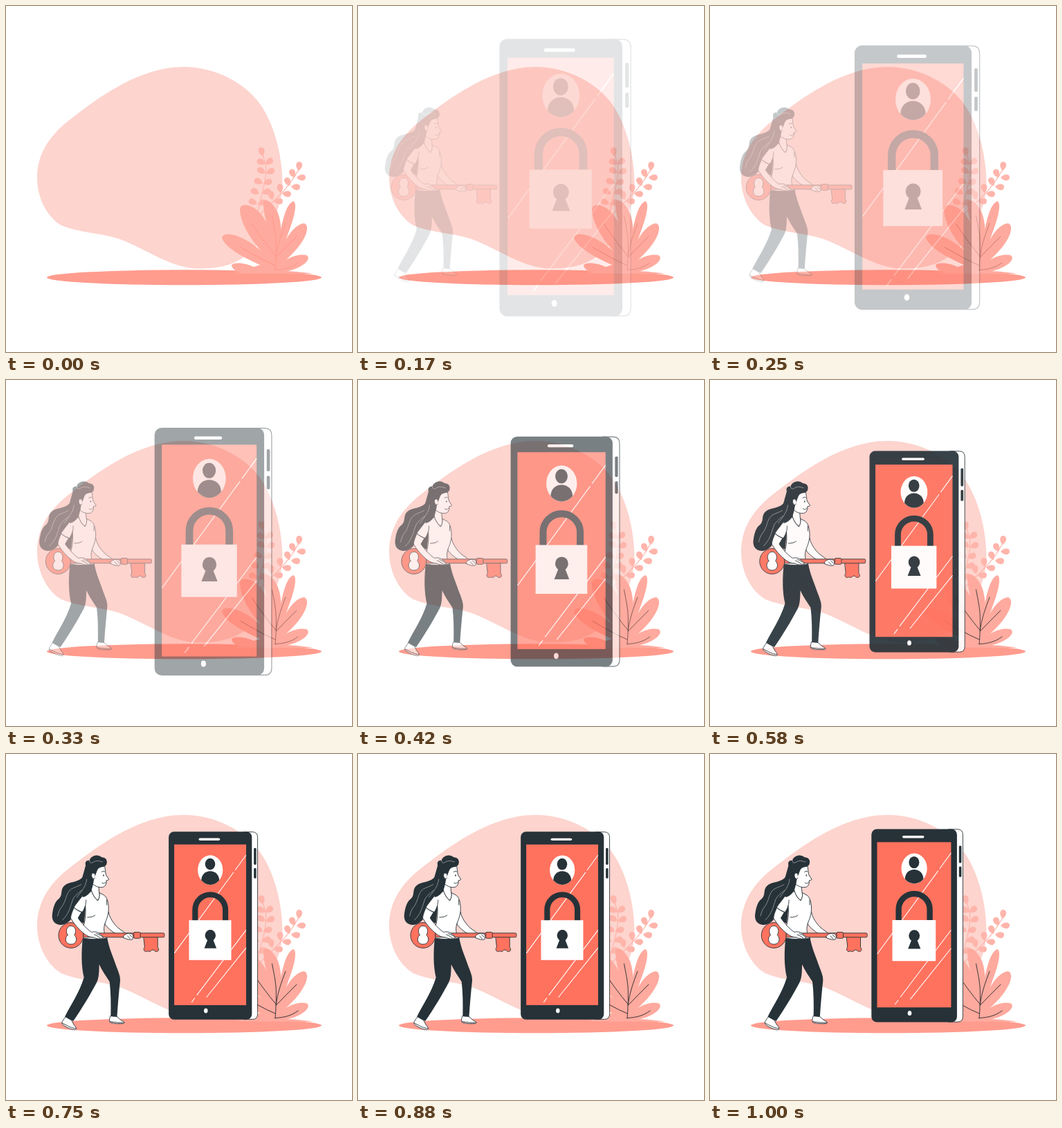
Animation, 500 px wide and 500 px high, one loop 1.04 s. Source, as an HTML page without scripts:

```html
<!DOCTYPE html>
<html lang="en">
<head>
<meta charset="utf-8">
<title>Unlock</title>
<style>
@property --p { syntax: "<number>"; inherits: true; initial-value: 0; }

html, body { margin: 0; width: 100%; height: 100%; overflow: hidden; background: #fff; }
svg { display: block; width: 100%; height: 100%; animation: enter 1.04s -4ms step-end infinite; }

/* cubic-bezier(.36, -.01, .5, 1.38) over one second, held at 24 steps a second */
@keyframes enter {
  0% { --p: 0 }      4% { --p: .013 }   8% { --p: .037 }   12% { --p: .075 }  16% { --p: .127 }
  20% { --p: .191 }  24% { --p: .264 }  28% { --p: .347 }  32% { --p: .437 }  36% { --p: .528 }
  40% { --p: .617 }  44% { --p: .702 }  48% { --p: .782 }  52% { --p: .853 }  56% { --p: .915 }
  60% { --p: .966 }  64% { --p: 1.006 } 68% { --p: 1.035 } 72% { --p: 1.055 } 76% { --p: 1.064 }
  80% { --p: 1.065 } 84% { --p: 1.056 } 88% { --p: 1.04 }  92% { --p: 1.015 } 96%, 100% { --p: 1 }
}

.veins, .phone, .woman { opacity: var(--p); }
.phone { transform-origin: 299.5px 248px; transform: scale(calc(1.5 - .5 * var(--p))); }
.woman { transform: translateX(calc(30px * (var(--p) - 1))); }

.dark { fill: #263238; }
.white { fill: #fff; }
.coral { fill: #ff725e; }
.ink { stroke: #263238; stroke-width: .9; stroke-linejoin: round; stroke-linecap: round; }
.line { fill: none; }
.shine { fill: none; stroke: #fff; stroke-width: 1.1; }
.strand { fill: none; stroke: #c3c8ca; stroke-width: .6; stroke-linecap: round; }
</style>
</head>
<body>
<svg viewBox="0 0 500 500">
  <defs>
    <path id="bud" d="M0 0C-6 -4 -6.500 -12.500 -1 -13C5 -13 6 -6 0 0z"/>
    <path id="ribs" d="M389 382C390 370 391 350 390 336C389 324 386 312 384.500 303M404 314C398 330 392 346 390.500 362M355.500 315C366 331 378 347 390 361.500M420 333C409 344 399 354 390.500 363M339 348.500C356 358 372 368 389 375M422 371C413 378 402 381 389 381.500"/>
  </defs>

  <path fill="#fdd4ce" d="M257 88C303 88 347 112 368 143C388 172 400 217 399.500 260C397 300 374 340 345 362C326 376 303 379.500 278 379.500C240 379.500 204 352 165 337C135 327 105 328 80 317C59 305 44.500 276 45 247C45.500 216 60 192 84 171C105 154 130 135 152 122C187 101 222 88 257 88z"/>
  <ellipse cx="257.500" cy="392.300" rx="198.500" ry="11" fill="#ff9c8e"/>

  <g fill="#ffb5ab">
    <path d="M363 303C367 275 379 250 375 228L371 215M365 304C382 284 405 270 423 236" fill="none" stroke="#ffb5ab" stroke-width="1.200"/>
    <use href="#bud" transform="translate(371 217) rotate(-10)"/>
    <use href="#bud" transform="translate(375 228) rotate(-64)"/>
    <use href="#bud" transform="translate(375 229) rotate(55)"/>
    <use href="#bud" transform="translate(375 241) rotate(-60)"/>
    <use href="#bud" transform="translate(376 242) rotate(68)"/>
    <use href="#bud" transform="translate(371 256) rotate(-65)"/>
    <use href="#bud" transform="translate(372 257) rotate(72)"/>
    <use href="#bud" transform="translate(366 271) rotate(-62)"/>
    <use href="#bud" transform="translate(370 271) rotate(72)"/>
    <use href="#bud" transform="translate(363 286) rotate(-62)"/>
    <use href="#bud" transform="translate(364 287) rotate(70)"/>
    <use href="#bud" transform="translate(423 238) rotate(8)"/>
    <use href="#bud" transform="translate(417 248) rotate(-22)"/>
    <use href="#bud" transform="translate(420 248) rotate(92)"/>
    <use href="#bud" transform="translate(410 260) rotate(-22)"/>
    <use href="#bud" transform="translate(412 261) rotate(98)"/>
    <use href="#bud" transform="translate(397 270) rotate(-4)"/>
    <use href="#bud" transform="translate(399 271) rotate(98)"/>
    <use href="#bud" transform="translate(385 280) rotate(-12)"/>
    <use href="#bud" transform="translate(387 282) rotate(94)"/>
  </g>

  <g fill="#ffaa9e">
    <path d="M340 385C331 383 326 379 326 374C332 369 348 372 358 377L374 372L392 372V386z"/>
    <path d="M390 384C362 372 318 354 312 335C314 325 338 329 364 350L392 372z"/>
    <path d="M390 376C366 354 339 322 338 294C339 284 354 286 366 298C378 310 388 340 394 370z"/>
    <path d="M390 372C385 342 371 302 372 284C374 276 385 283 392 297C399 312 400 340 394 372z"/>
    <path d="M390 372C394 340 400 288 415 282C422 284 416 308 408 328C403 342 398 358 392 374z"/>
    <path d="M389 378C395 350 413 315 431 314C440 318 433 336 421 350C412 361 401 370 389 382z"/>
    <path d="M388 384C398 366 420 357 434 360C441 364 434 373 420 379C410 383 400 385 388 385z"/>
    <path d="M330 386.500C360 380 420 382 444 387z"/>
  </g>
  <use href="#ribs" fill="none" stroke="#ff9c8e" stroke-width="1.200"/>
  <use href="#ribs" class="veins line ink"/>

  <g class="phone">
    <path class="white ink" d="M345 108.800H358Q365.400 109 365.400 117V379Q365.400 387.200 358 387.200H345z"/>
    <rect class="dark" x="359.800" y="132.500" width="3.600" height="25" rx="1.600"/>
    <rect class="dark" x="359.800" y="162.500" width="3.600" height="15.300" rx="1.600"/>
    <rect class="dark" x="233.300" y="108.400" width="123.600" height="279.200" rx="8"/>
    <rect class="coral" x="241.500" y="127.400" width="106.900" height="238.800"/>
    <rect class="white" x="278" y="118" width="31.400" height="3.500" rx="1.750"/>
    <ellipse class="white" cx="288.500" cy="374.500" rx="2.800" ry="3.500"/>
    <path class="shine" d="M348.300 143.100L331.900 165.700M329.800 168.600L241.700 289M348.300 254.500L275 351.500M272.200 355.500L267.300 362M348.300 281L289.300 354.700"/>

    <ellipse class="white" cx="295.100" cy="165.400" rx="18.600" ry="21.900"/>
    <ellipse class="dark" cx="294.900" cy="156.600" rx="7.500" ry="8.700"/>
    <path class="dark" d="M281.800 180.700C281.800 172 288 167 295 167S308.400 172 308.400 180.700A18.600 21.900 0 0 1 281.800 180.700z"/>

    <path d="M272.600 241V224.500A22.500 22.500 0 0 1 317.600 224.500V241" fill="none" stroke="#263238" stroke-width="8.400"/>
    <rect class="white" x="263.500" y="240" width="62.700" height="59.200"/>
    <ellipse class="dark" cx="295.200" cy="262.600" rx="7.900" ry="8.400"/>
    <path class="dark" d="M291.500 268H299L304.300 281.600H286.200z"/>
  </g>

  <g class="woman">
    <!-- hair behind -->
    <path class="dark" d="M115 158C111 166 114 173 108 179C101 186 90 184 83 190C76 196 81 203 75 209C68 214 66 224 65 234C65 242 70 247 78 247C86 246 92 241 95 234C99 236 104 242 111 245L114 216L121 198L128 180z"/>
    <path class="strand" d="M118 172C116 189 102 190 93 195C84 201 86 213 78 222C75 226 74 230 73 234M119 181C113 197 100 200 95 210C91 221 90 230 80 240"/>

    <!-- shoes and trousers -->
    <path class="white ink" d="M84 380C82 384 78 387 79.500 390C83 394 91 398 98 398.500C101 398 100 395 97 392L93 385z"/>
    <path class="white ink" d="M149 379C148 383 147 386 149 388C155 390 163 390 168 389.500C171 388 168 386 165 385L158 379z"/>
    <path class="line ink" d="M80 389C86 392 92 396 99 396.500M148.500 386.500C155 388 163 388.500 169 388"/>
    <path class="dark" d="M109.500 264L144.500 265C147 280 152 290 156 302C159 311 164 320 163.300 328C161.500 344 160 362 158.800 380L149.700 379C150 362 150 345 148 329C143 321 137 313 133 304C133 315 132.500 324 129.500 330C120 348 108 368 95.500 386L83.500 379.500C92 362 104 346 111 323C107 306 107 286 109.500 264z"/>

    <!-- far arm -->
    <path class="white ink" d="M138 228L146.500 228C148 237 154 245 160 251C165 255 169 257 172 260L168 265C158 261 148 255 142 247z"/>

    <!-- neck and shirt -->
    <path class="white ink" d="M121 184L122 199C126 208 130 211 131 211C134 208 134 204 133 200L132 189z"/>
    <path class="white ink" d="M122 198.500C117 200 112 201 109.500 204C105 210 100 216 96.300 221.500C100 225 104 227 108.500 228.500C111 225 112 222 113 219C114 230 113 239 111 246C109.500 253 109.500 260 109.500 266C121 268 133 268 144 266C139 258 139 251 142 243C145 236 147 229 146.500 221C146 213 144 207 140 204L133.500 200.500C134 205 133 209 131 212C127 209 124 204 122 198.500z"/>
    <path class="line ink" d="M113 219C114 216 114 213 114 211M116 236C121 236 125 235 127 233M144 211L144 218"/>

    <!-- head -->
    <path class="white ink" d="M122 168C128 162 136 161 141 162C142 168 142 172 143 175L147 181C147 182.500 145 182.500 143.500 182.500C143.500 187 142.500 191.500 138 192.500C133 193 128 192 124 188z"/>
    <path class="dark" d="M113.500 161C112 156 115 153 119 154C120 149 125 146.500 130 146.500C134 147 136 149 138 149.500C143 149.500 146 155 143 160.500C140 164 135 163 132.500 165C129 168 129 174 126 178C125 184 124 192 121 198C118 203 114 206 109 207L107 184z"/>
    <path class="white ink" d="M126.500 173C123 170 121 174 122.500 178C123.500 181 126 181 127 179"/>
    <path class="strand" d="M119 154C119 158 122 158 125 156C130 153 134 155 138 156M115 181C114 192 106 200 101 207"/>
    <path class="line ink" d="M137 186C139 188 142 187 142.500 185M136.500 170.500C138 169 140 169 141 170"/>
    <ellipse class="dark" cx="139.300" cy="175.500" rx=".8" ry="1.300"/>

    <!-- key -->
    <g class="coral ink">
      <path d="M197.500 264H217.500V279.500C219.500 281 219.500 285 216.500 285.300C213 286 213 283 210.500 283S208 286 205 285.300C202 284 202 286 199.500 285.300C197 284 197 281 198.500 279.500z"/>
      <rect x="106" y="258.800" width="121.200" height="6" rx="1.500"/>
      <rect x="183" y="257.500" width="9.500" height="8.800" rx="1.500"/>
      <ellipse cx="92.300" cy="262" rx="18" ry="18.400"/>
    </g>
    <path class="white ink" d="M87.300 261.500C83.500 255 87 248.300 92.300 248.300S101.200 255 97.300 261.500C102.500 267 100 275 92.300 275S82 267 87.300 261.500z"/>

    <!-- hands and near arm -->
    <path class="white ink" d="M168 263C171 260 175 258.500 179 259.500C183 261 183 265 181 268C177 269 173 267.500 169 266z"/>
    <path class="line ink" d="M174 263L178 267M177 261L181 265"/>
    <path class="white ink" d="M96.500 222C94 228 91.500 234 92 237.500C97 246 104 254 111 259.500C115 263 120 265 125 265C129 267 135 268 138 266C140 264 137 262 135 261C131 257 126 256 122 257.500C115 253 107 244 102.500 237L107.500 228.500C103 227 100 225 96.500 222z"/>
    <path class="line ink" d="M126 261C129 262 132 264 135 266M129 259.500C132 260.500 135 262 138 264.500"/>
  </g>
</svg>
</body>
</html>
```
